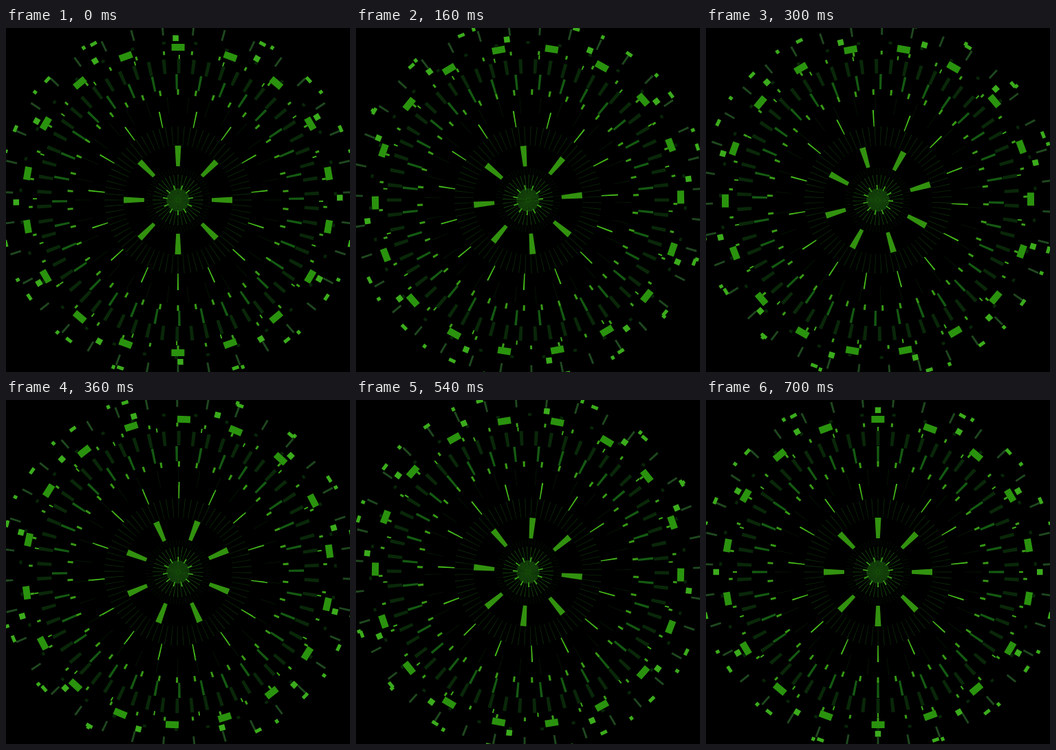
An HTML page with a canvas that plays this animation: 500x500 px, repeating every 720 ms.

```html
<!DOCTYPE html>
<html lang="en">
<head>
<meta charset="utf-8">
<title>Radial rings</title>
<style>
html, body { margin: 0; width: 100%; height: 100%; overflow: hidden; background: #000; }
canvas { display: block; }
</style>
</head>
<body>
<canvas id="stage" width="500" height="500"></canvas>
<script>
const ctx = document.getElementById('stage').getContext('2d');
const LOOP = 720, STEPS = 36;

// n marks from radius r0 to r1, widths w0 to w1.
// shift: starting offset, turn: travel per loop (both in mark spacings).
const ring = (n, r0, r1, w0, w1, color, shift, turn, eased) =>
  ({ n, r0, r1, w0, w1, color, shift, turn, eased });

const rings = [
  // core
  ring(60, 1, 17, 0.3, 0.9, '#1b520d', 0, 1, false),
  ring(36, 17, 37, 0.6, 0.9, '#154a0c', 0, 2, true),
  ring(11, 15, 22, 1.2, 1.8, '#42b41c', 0.5, 1, true),
  ring(60, 38, 47, 0.4, 0.6, '#051a03', 0, -1, false),
  // middle
  ring(8, 49, 79, 5.5, 9, '#32920f', 0, -1, true),
  ring(72, 79, 107, 0.6, 0.9, '#0c2e08', 0, 4, true),
  ring(15, 107, 131, 1.4, 2, '#47c01b', 0.5, 1, true),
  ring(30, 126, 150, 0.6, 0.8, '#061c04', 0.5, 1, true),
  ring(38, 153, 161, 2.8, 3.2, '#379a14', 0, 2, true),
  // outer
  ring(32, 161, 183, 3, 3.6, '#145a12', 0, -2, false),
  ring(58, 184, 205, 4.5, 5.2, '#092709', 0, 2, false),
  ring(20, 205, 211, 1.8, 2, '#3fb01a', 0, 1, false),
  ring(33, 211.5, 217, 3, 3, '#3a9f18', 0.5, -1, true),
  ring(18, 217, 227, 19, 19, '#2a930e', 0, 4, true),
  ring(31, 227, 231, 5, 5, '#082508', 0.5, 2, false),
  ring(12, 231, 239.5, 8.5, 8.5, '#3bac1c', 0, -1, false),
  ring(35, 240, 256, 2.8, 3, '#1f481f', 0.5, -1, true),
  ring(19, 255.5, 260.5, 10, 10, '#3bac1c', 0.5, 3, true),
  ring(17, 257.5, 263, 5, 5, '#3bac1c', 0.5, -3, true)
];

const ease = p => p < 0.5 ? 2 * p * p : 1 - 2 * (1 - p) * (1 - p);

function drawRing(g, step) {
  const p = g.eased ? ease((step + 0.5) / STEPS) : (step + 1) / STEPS;
  const gap = Math.PI * 2 / g.n;
  const start = (g.shift + g.turn * p) * gap;
  ctx.fillStyle = g.color;
  for (let i = 0; i < g.n; i++) {
    const a = start + i * gap, s = Math.sin(a), c = Math.cos(a);
    const point = (x, r) => [250 + x * c + r * s, 250 + x * s - r * c];
    ctx.beginPath();
    ctx.moveTo(...point(-g.w0 / 2, g.r0));
    ctx.lineTo(...point(-g.w1 / 2, g.r1));
    ctx.lineTo(...point(g.w1 / 2, g.r1));
    ctx.lineTo(...point(g.w0 / 2, g.r0));
    ctx.fill();
  }
}

function draw(time) {
  const step = Math.floor((time % LOOP) / (LOOP / STEPS));
  ctx.fillStyle = '#000';
  ctx.fillRect(0, 0, 500, 500);
  ctx.fillStyle = '#082406';
  ctx.beginPath();
  ctx.arc(250, 250, 16.5, 0, Math.PI * 2);
  ctx.fill();
  for (const g of rings) drawRing(g, step);
}

const t0 = performance.now();
function tick() {
  draw(performance.now() - t0);
  requestAnimationFrame(tick);
}
tick();
</script>
</body>
</html>
```
